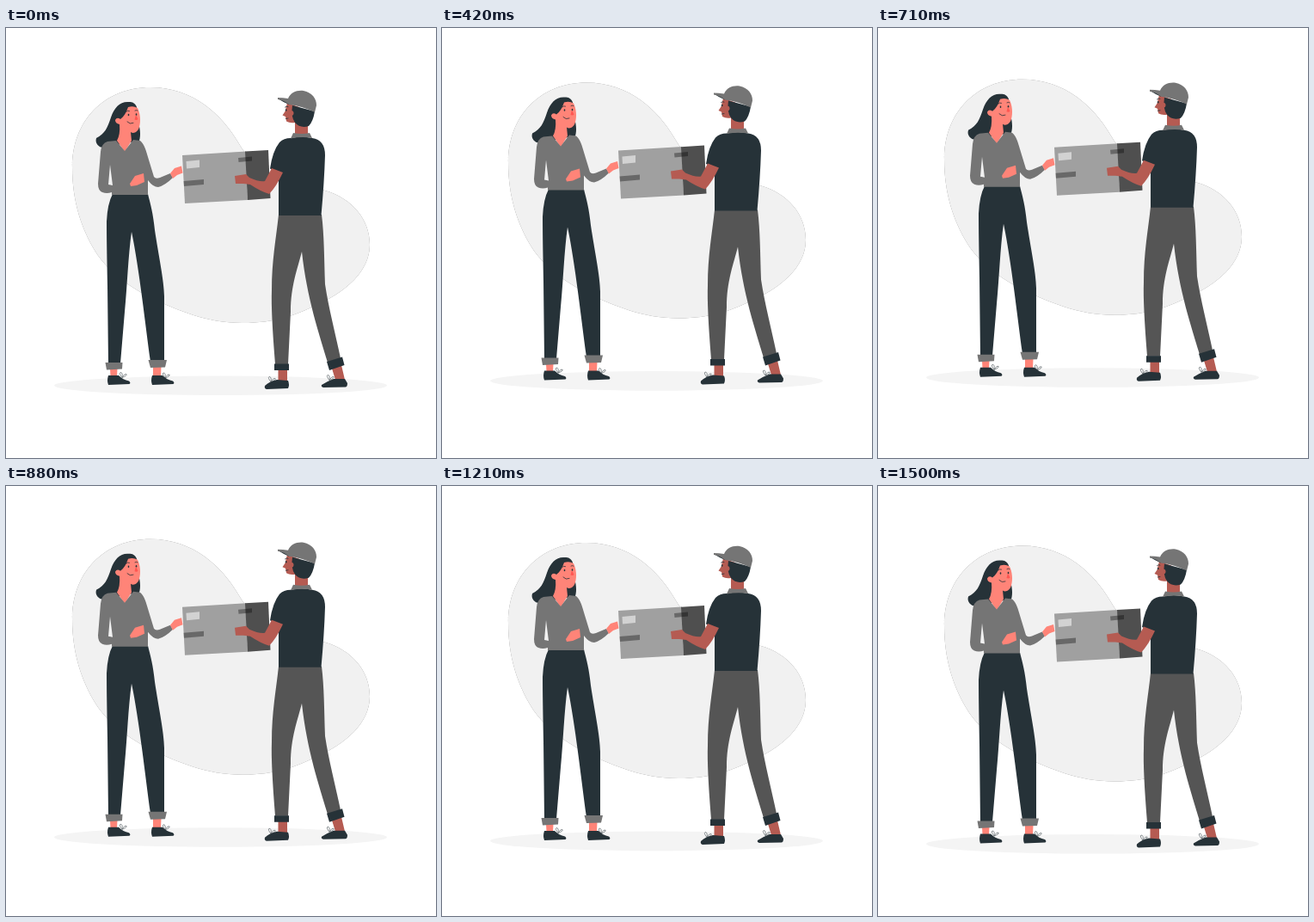
Recreate the animation shown at these times as an HTML page. Size 500 by 500 pixels, loop 1.54 s.

```html
<!DOCTYPE html>
<html lang="en">
<head>
<meta charset="utf-8">
<title>Parcel handover</title>
<style>
  html, body { margin: 0; height: 100%; overflow: hidden; background: #fff; }
  svg { display: block; width: 100%; height: 100%; }
  .dark { fill: #263238; }
  .grey { fill: #757575; }
  .slate { fill: #555; }
  .skin { fill: #ff8478; }
  .tan { fill: #b55b52; }
  .line { fill: none; stroke: #263238; stroke-width: .8; stroke-linecap: round; }
  .lace { fill: #fff; stroke: #6b7377; stroke-width: .8; }
</style>
</head>
<body>
<svg viewBox="0 0 500 500">
  <defs>
    <path id="blob" d="M77 162C77 108 114 69 168 69C218 69 251 101 270 133C294 175 329 177 371 189C402 198 423 222 423 252C423 284 393 307 365 320C338 334 312 343 275 343C232 343 200 328 169 314C141 300 117 281 104 260C88 234 77 202 77 162Z"/>
    <path id="lace" class="lace" d="M0 4Q-4 -1 -2 -2Q1 -2 0 4Q3 -1 5 0Q6 2 0 4Z"/>
  </defs>
  <g id="scene">
    <use href="#blob" class="grey"/>
    <use href="#blob" fill="#fff" fill-opacity=".9"/>
    <ellipse cx="249.5" cy="415.8" rx="193.5" ry="11.3" fill="#f4f4f4"/>

    <g id="customer">
      <path class="dark" d="M143 86C133 85 126 92 122 104C118 116 115 123 105 128C103 134 108 139 113 139L155 131C157 125 156 115 153 108L152 92C150 87 147 86 143 86Z"/>
      <path class="skin" d="M133 106C137 103 140 98 142 92Q148 90 153 93C156 99 157 108 155 115C153 122 148 123 145 121L146 131L138 144L129 131Q133 124 132 112Q127 111 127 107Q129 103 133 106Z"/>
      <path d="M151 101L153.500 106Q152 107.500 149.500 106.500Z" fill="#ff5652"/>
      <path class="line" d="M141 109Q144 112.500 148 110.500M139.500 97.500Q141 95.500 143.500 96.500M150 96Q151.500 95 153 96"/>
      <ellipse class="dark" cx="142.500" cy="101" rx=".8" ry="1.300"/>
      <ellipse class="dark" cx="151.500" cy="100.500" rx=".8" ry="1.300"/>
      <path class="skin" d="M121 396H129.500L129 405H121.500ZM171 394H180.500L180 405H171Z"/>
      <path class="dark" d="M124 193H165C168 205 171 215 173 235C177 262 184 295 184 312V388H168C162 345 155 280 146 237C142 265 141 300 138 330L133 390H119L118 300Q117 250 117 225Q118 204 124 193Z"/>
      <path class="grey" d="M115.500 389H135.500L135 396.500L117 397.500ZM165.500 386H187L185 394.500L168 395Z"/>
      <use href="#lace" x="135" y="402.500"/>
      <use href="#lace" x="185" y="403"/>
      <path id="shoe" class="dark" d="M119 404H131Q136 409 143 410.500Q145.500 412.500 143.500 414L119 415Q117 410 119 404Z"/>
      <use href="#shoe" x="51"/>
      <path class="grey" fill-rule="evenodd" d="M128 131L138 143L148 130L156 131C161 135 163 143 165 150L172 173Q174 176 179 174L191 169L194 174Q185 183 177 185Q171 185 165 177V194H123V191Q117 193 112 191Q107 189 107 181L110 144Q111 134 118 132ZM121 159L119 182L124 183Z"/>
      <path class="skin" d="M144 181L150 172L160 169L161 179L152 183L145 184Z"/>
    </g>

    <g id="parcel">
      <path fill="#a0a0a0" d="M205 148L279 143.500L281 200L208 204Z"/>
      <path fill="#4f4f4f" d="M278 143.600L305 142L307.500 198L281 200Z"/>
      <path fill="#d2d2d2" d="M209.500 155L225 153.500V162L210 163.500Z"/>
      <path fill-opacity=".35" d="M206.500 178L230 176V182L207 184ZM270 151L286 149.500V154.500L270.500 156Z"/>
    </g>
    <path class="skin" d="M191 169L196 163L204 160.500L205.500 168.500L199 171L194 175Z"/>

    <g id="courier">
      <path class="tan" d="M327 87L324.500 97L321.500 101.500L325 103L326 108.500Q330 111 336 110V124H351V112L341 92Z"/>
      <path class="dark" d="M333 90L359 97Q357 109 352 114Q342 117 336 110Q331 103 333 90ZM316 82L329 84L329 89Q322 86 316 82Z"/>
      <circle class="tan" cx="331.500" cy="99" r="3"/>
      <path class="line" d="M324.500 92Q326 90.500 328 91.500M325.500 105.500L328 105"/>
      <ellipse class="dark" cx="325.700" cy="95.500" rx=".8" ry="1.300"/>
      <path class="grey" d="M316 81Q322 81 328 82C331 75 338 72 346 73C356 75 361 82 361 90L359 98Q345 91 329 89Q323 84 316 83Z"/>
      <path class="tan" d="M316.500 396H327V411H316.500ZM379 396L390 392L394 409H383Z"/>
      <path class="slate" d="M317 217H367C370 240 370 270 371 298C375 325 383 355 389 384L374 389C364 355 350 315 344 260C339 280 331 300 331 330L328 391H313Q308 330 309 305C309 270 314 245 317 217Z"/>
      <path class="dark" d="M312 390.500H329V398H312ZM373 388L391 382.500L393.500 392L376 398Z"/>
      <use href="#lace" x="308" y="407.500"/>
      <use href="#lace" x="376" y="405.500"/>
      <path class="dark" d="M301 416Q306 411 315 409L328 410Q330 415 328 419L303 420Q300 419 301 416ZM367 415Q373 411 381 408H394L397 413Q397 417 395 417.500L369 418Q366 417 367 415Z"/>
      <path class="dark" d="M331 128Q344 125 356 128Q371 130 371 148Q370 180 366.500 218H317V168L307 163.500Q310 143 318 133Q323 128 331 128Z"/>
      <path class="grey" d="M331 128.500L334 122Q344 124 353 122L356 128Q344 126 331 128.500Z"/>
      <path class="tan" d="M309 163L322 168Q314 185 306 193Q296 190 284 182L276 181H267L266 172L279 170L283 174Q294 179 301 178Z"/>
    </g>
  </g>
</svg>
<script>
  const scene = document.getElementById("scene");
  const LOOP = 1540, PHASE = 50, RISE = 10, REST = 0.65;
  const start = performance.now();

  // Rises and falls at constant speed
  function draw() {
    const p = ((performance.now() - start + PHASE) % LOOP) / LOOP;
    const lift = RISE * (1 - Math.abs(1 - 2 * p));
    scene.setAttribute("transform", `translate(0 ${(REST - lift).toFixed(3)})`);
    requestAnimationFrame(draw);
  }
  draw();
</script>
</body>
</html>
```
